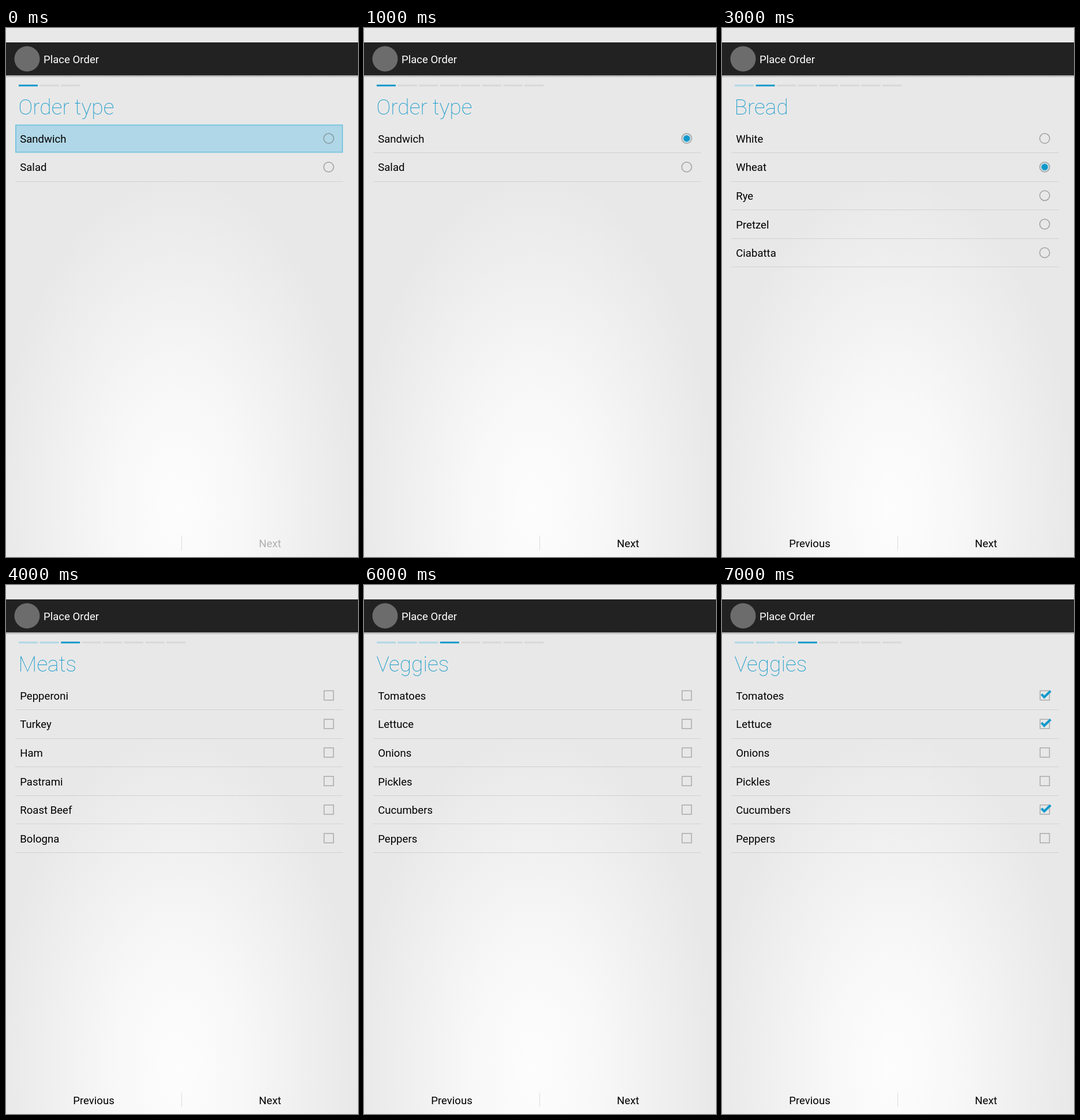
An HTML page with a canvas that plays this animation: 610 px wide and 918 px high, repeating every 8000 ms.

```html
<!DOCTYPE html>
<html lang="en">
<head>
<meta charset="utf-8">
<title>Place Order</title>
<style>
  html, body { margin: 0; width: 100%; height: 100%; overflow: hidden; background: #e8e8e8; }
  canvas { display: block; }
</style>
</head>
<body>
<canvas id="stage" width="610" height="918"></canvas>
<script>
const ctx = document.getElementById('stage').getContext('2d');
const WIDTH = 610, HEIGHT = 918;
const STEP_MS = 1000, ROW_PITCH = 49.55, FIRST_ROW = 191.7;
const BLUE = '#1098ca';

const pages = [
  { title: 'Order type', items: ['Sandwich', 'Salad'] },
  { title: 'Bread', items: ['White', 'Wheat', 'Rye', 'Pretzel', 'Ciabatta'] },
  { title: 'Meats', multi: true, items: ['Pepperoni', 'Turkey', 'Ham', 'Pastrami', 'Roast Beef', 'Bologna'] },
  { title: 'Veggies', multi: true, items: ['Tomatoes', 'Lettuce', 'Onions', 'Pickles', 'Cucumbers', 'Peppers'] }
];

// One entry per second of the loop
const states = [
  { page: 0, chosen: [], steps: 3, pressed: 0, locked: true },
  { page: 0, chosen: [0], steps: 8 },
  { page: 1, chosen: [], steps: 8, locked: true },
  { page: 1, chosen: [1], steps: 8 },
  { page: 2, chosen: [], steps: 8 },
  { page: 2, chosen: [1, 4], steps: 8 },
  { page: 3, chosen: [], steps: 8 },
  { page: 3, chosen: [0, 1, 4], steps: 8 }
];

function rect(x, y, w, h, color) {
  ctx.fillStyle = color;
  ctx.fillRect(x, y, w, h);
}

function disc(x, y, r, color) {
  ctx.fillStyle = color;
  ctx.beginPath();
  ctx.arc(x, y, r, 0, Math.PI * 2);
  ctx.fill();
}

function label(text, x, y, color = '#000', align = 'left', font = '400 18.6px') {
  ctx.font = `${font} Roboto, sans-serif`;
  ctx.textAlign = align;
  ctx.fillStyle = color;
  ctx.fillText(text, x, y);
}

function drawBackground() {
  rect(0, 0, WIDTH, HEIGHT, '#e8e8e8');
  ctx.save();
  ctx.translate(297, 835);
  ctx.scale(1, 1.85);
  const glow = ctx.createRadialGradient(0, 0, 0, 0, 0, 315);
  glow.addColorStop(0, '#fdfdfd');
  glow.addColorStop(0.35, '#f8f8f8');
  glow.addColorStop(1, '#e8e8e8');
  rect(-297, -HEIGHT, WIDTH, HEIGHT * 2, glow);
  ctx.restore();
}

function drawHeader() {
  rect(0, 25, WIDTH, 57, '#222');
  const shadow = ctx.createLinearGradient(0, 82, 0, 86);
  shadow.addColorStop(0, 'rgba(0,0,0,.32)');
  shadow.addColorStop(1, 'rgba(0,0,0,0)');
  rect(0, 82, WIDTH, 4, shadow);
  disc(36.5, 53.5, 22, '#6c6c6c');
  label('Place Order', 65, 61, '#fff');
}

function drawSteps(count, active) {
  for (let i = 0; i < count; i++) {
    const color = i === active ? BLUE : i < active ? '#b0d7e5' : '#d8d8d8';
    rect(22 + i * 36.6, 98.3, 33, 3, color);
  }
}

function drawRadio(x, y, on) {
  ctx.lineWidth = 1.5;
  ctx.strokeStyle = 'rgba(90,90,90,.5)';
  ctx.beginPath();
  ctx.arc(x, y, 8.6, 0, Math.PI * 2);
  ctx.stroke();
  if (on) {
    disc(x, y, 7.2, '#b5d5e1');
    disc(x, y, 5.5, BLUE);
  }
}

function drawCheckbox(x, y, on) {
  ctx.lineWidth = 1.4;
  ctx.strokeStyle = '#a6a6a6';
  ctx.strokeRect(x - 7.9, y - 8.2, 16.2, 16.2);
  if (!on) return;
  ctx.beginPath();
  ctx.moveTo(x - 5.5, y - 2.2);
  ctx.lineTo(x - 0.8, y + 2.8);
  ctx.lineTo(x + 10.2, y - 7.8);
  ctx.lineWidth = 5.2;
  ctx.strokeStyle = 'rgba(140,205,228,.65)';
  ctx.stroke();
  ctx.lineWidth = 3.7;
  ctx.strokeStyle = BLUE;
  ctx.stroke();
}

function drawList(page, chosen, pressed) {
  const drawMark = page.multi ? drawCheckbox : drawRadio;
  page.items.forEach((item, i) => {
    const y = FIRST_ROW + i * ROW_PITCH;
    if (i === pressed) {
      rect(16, 167.5, 568, 49, '#7cc6e0');
      rect(18, 169.5, 564, 45, '#b0d7e7');
    } else {
      rect(16, Math.round(y + 24.3), 568, 1, '#d1d1d1');
    }
    label(item, 24.2, y + 7.2);
    drawMark(559.2, y, chosen.includes(i));
  });
}

function drawFooter(pageIndex, locked) {
  rect(304, 881, 1, 25, '#dadada');
  if (pageIndex > 0) label('Previous', 152, 901, '#000', 'center');
  label('Next', 457.5, 901, locked ? '#b0b0b0' : '#000', 'center');
}

function frame(now) {
  const state = states[Math.floor(now / STEP_MS) % states.length];
  const page = pages[state.page];
  drawBackground();
  drawHeader();
  drawSteps(state.steps, state.page);
  label(page.title, 21.5, 149.5, BLUE, 'left', '100 37.2px');
  drawList(page, state.chosen, state.pressed);
  drawFooter(state.page, state.locked);
}

const start = performance.now();
function tick() {
  frame(performance.now() - start);
  requestAnimationFrame(tick);
}
tick();
</script>
</body>
</html>
```
